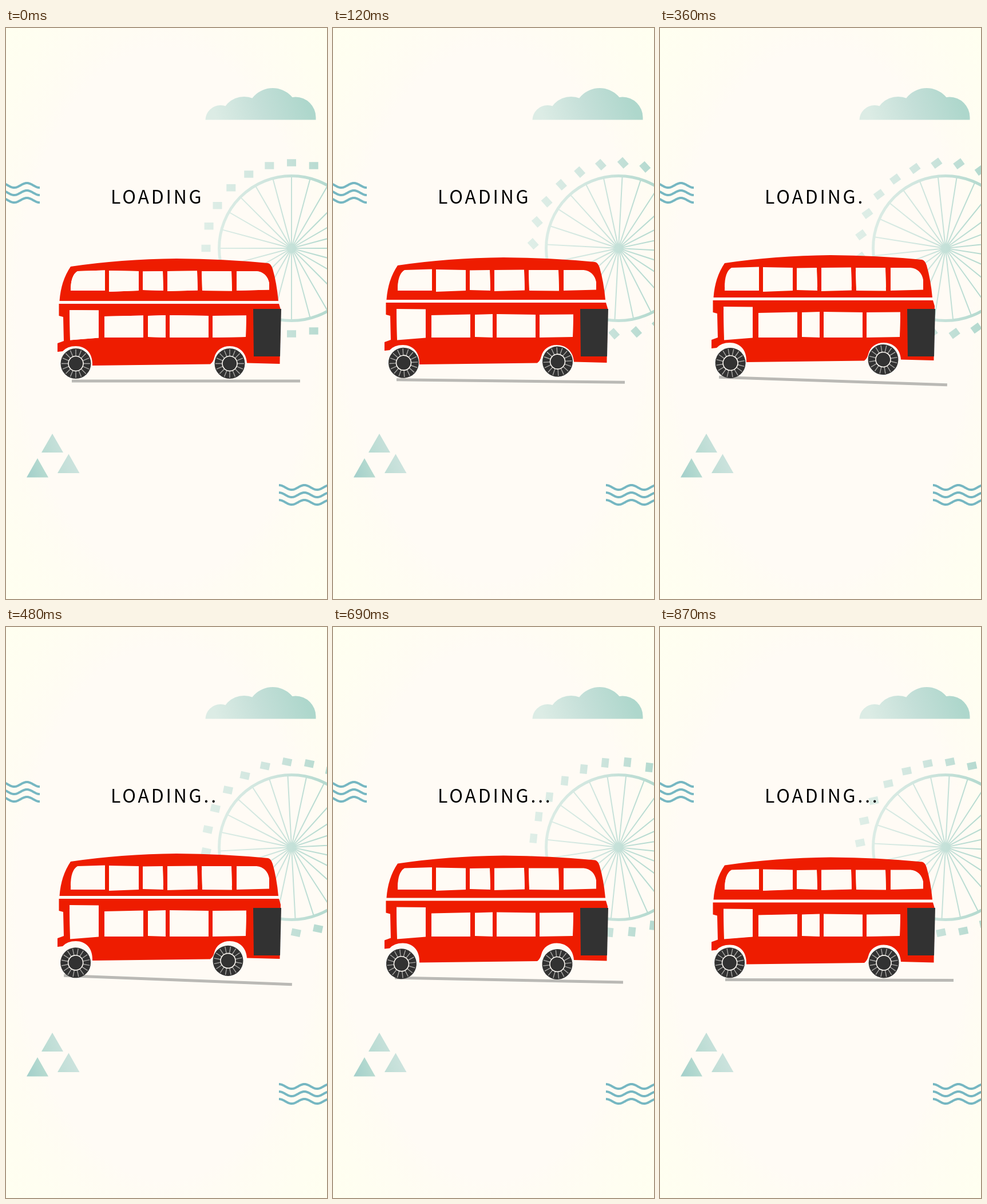
Recreate the animation shown at these times as an HTML page with a canvas. Size 561 by 998 pixels, loop 0.9 s.

```html
<!DOCTYPE html>
<html lang="en">
<head>
<meta charset="utf-8">
<title>Loading</title>
<style>
  html, body { margin: 0; width: 100%; height: 100%; overflow: hidden; background: #fffff0; }
  canvas, svg { position: absolute; left: 0; top: 0; width: 561px; height: 998px; }
  text { font: 400 32px "Noto Sans CJK SC", "Noto Sans CJK JP", "Noto Sans CJK", "Noto Sans", sans-serif; letter-spacing: 3.8px; }
</style>
</head>
<body>
<canvas id="stage"></canvas>
<svg viewBox="0 0 561 998"><text id="label" x="183" y="307">LOADING</text></svg>
<script>
const W = 561, H = 998, LOOP = 900, STEP = 30, TAU = Math.PI * 2;
const CREAM = '#fffbf5', RED = '#ee1c00', DARK = '#323232';
const canvas = document.getElementById('stage');
const label = document.getElementById('label');
const ctx = canvas.getContext('2d');
const dpr = window.devicePixelRatio || 1;
canvas.width = W * dpr;
canvas.height = H * dpr;

function linear(x0, y0, x1, y1, ...colors) {
  const g = ctx.createLinearGradient(x0, y0, x1, y1);
  colors.forEach((c, i) => g.addColorStop(i / (colors.length - 1), c));
  return g;
}
const eyeTint = linear(345, 0, 575, 0, '#dfeee7', '#cfe5de', '#b0d8cd');
const cloudTint = linear(370, 168, 520, 118, '#dcece5', '#c4dfd8', '#aed7cc');
const hillTint = linear(36, 785, 128, 755, '#a2cfca', '#b5dad0', '#c3dfd8', '#cfe4df');
const glow = ctx.createRadialGradient(0, 0, 0, 0, 0, 396);
[[0, CREAM], [0.66, CREAM], [0.72, '#fffcf3'], [0.88, '#fffef1'], [1, '#fffff0']]
  .forEach(([p, c]) => glow.addColorStop(p, c));

const body = new Path2D(
  'M113 417Q200 404 298 403Q380 403.5 458 411Q463 412 466 421Q473 445 476 477H93.5Q96 442 113 417Z' +
  'M92.5 482H477L480 492L478.5 587L421 585.5C420 567 407 556 391 556C378 556 367 563 364 576' +
  'Q362 584 357 587.5L151 590C152 568 139 556 122 556Q107 556 99 565L90 566V551L101 547L100 505L92.5 503Z');
const panes = new Path2D(
  'M113 459Q113 432 125 425L173 423.5V459Z' +
  'M180 424L232 425V459L180 461Z' +
  'M239 425.5L274 425L275 459L239 458Z' +
  'M282 425L334 424.5L335 458.5L282 460Z' +
  'M342 425H394L395 459.5L343 459Z' +
  'M403 425H438Q456 427 460 446V457.5L403 459Z' +
  'M111 493L162 493.5V541.5L112 545.5Z' +
  'M172 504L240 502.5V541H172Z' +
  'M248 503L279 502V541L248 540Z' +
  'M286 502L354 503V541H286Z' +
  'M361 503L420 502.5L419 540L361 541Z');
const door = new Path2D('M432 491H481L479 574H433Z');
const hills = new Path2D(
  'M81 709L100 742H62ZM55 752L74 785.5H36ZM109.5 744.5L128.5 778H90Z');

// Rows of [time, dx, dy]
const FRONT = [[0, 0, 0], [225, 2.7, -2.5], [450, 0, 0], [675, -2.7, 2.4], [900, 0, 0]];
const REAR = [[0, 0, 0], [225, 2.8, -6.4], [360, -1, -7], [450, -3.5, -4],
  [570, -1.5, -0.5], [682, 1, 3.1], [900, 0, 0]];

function at(keys, t) {
  const i = keys.findIndex(k => k[0] > t);
  const [t0, x0, y0] = keys[i - 1], [t1, x1, y1] = keys[i];
  const p = (t - t0) / (t1 - t0);
  return [x0 + (x1 - x0) * p, y0 + (y1 - y0) * p];
}

function local(x, y, angle, draw) {
  ctx.save();
  ctx.translate(x, y);
  ctx.rotate(angle);
  draw();
  ctx.restore();
}

function fill(path, color) {
  ctx.fillStyle = color;
  ctx.fill(path);
}

function disc(r, color) {
  ctx.beginPath();
  ctx.arc(0, 0, r, 0, TAU);
  ctx.fillStyle = color;
  ctx.fill();
}

function background() {
  ctx.save();
  ctx.translate(W / 2, H / 2);
  ctx.scale(1, H / W);
  ctx.fillStyle = glow;
  ctx.fillRect(-W, -W, 2 * W, 2 * W);
  ctx.restore();
}

function cloud() {
  ctx.save();
  ctx.beginPath();
  ctx.rect(340, 95, 210, 65.5);
  ctx.clip();
  ctx.beginPath();
  for (const [x, y, r] of [[375, 161.5, 26.5], [416, 160.5, 40.5], [466, 150, 45], [506, 156, 35.5]]) {
    ctx.moveTo(x + r, y);
    ctx.arc(x, y, r, 0, TAU);
  }
  ctx.rect(375, 145, 131, 16);
  ctx.rect(500, 156, 41.5, 5);
  ctx.fillStyle = cloudTint;
  ctx.fill();
  ctx.restore();
}

function waves(x0, x1, crest, mid) {
  ctx.strokeStyle = '#76b7c2';
  ctx.lineWidth = 4;
  for (let row = 0; row < 3; row++) {
    ctx.beginPath();
    for (let x = x0; x <= x1; x++) {
      ctx.lineTo(x, mid + row * 13 - 4 * Math.cos((x - crest) * TAU / 44.5));
    }
    ctx.stroke();
  }
}

// The tint stays fixed on the stage while the geometry turns.
function bigWheel(turn) {
  const cx = 499, cy = 385;
  ctx.strokeStyle = ctx.fillStyle = eyeTint;
  ctx.lineWidth = 5;
  ctx.beginPath();
  ctx.arc(cx, cy, 126.5, 0, TAU);
  ctx.stroke();
  const spokes = new Path2D(), cabins = new Path2D(), cabin = new Path2D();
  cabin.rect(-8, -6.25, 16, 12.5);
  for (let i = 0; i < 24; i++) {
    const a = i * TAU / 24 + turn, c = Math.cos(a), s = Math.sin(a);
    spokes.moveTo(cx, cy);
    spokes.lineTo(cx + 126 * c, cy + 126 * s);
    cabins.addPath(cabin, new DOMMatrix()
      .translate(cx + 149.5 * c, cy + 149.5 * s).rotate(turn * 360 / TAU));
  }
  ctx.lineWidth = 2;
  ctx.stroke(spokes);
  ctx.fill(cabins);
}

function tyre(x, y, [dx, dy], turn) {
  local(x + dx, y + dy, turn, () => {
    disc(26.5, DARK);
    ctx.strokeStyle = '#aaa9a6';
    ctx.lineWidth = 1.4;
    ctx.beginPath();
    for (let i = 0; i < 16; i++) {
      const a = i * TAU / 16, c = Math.cos(a), s = Math.sin(a);
      ctx.moveTo(13 * c, 13 * s);
      ctx.lineTo(25 * c, 25 * s);
    }
    ctx.stroke();
    disc(13.8, CREAM);
    disc(12.2, DARK);
  });
}

function draw(t) {
  const turn = t / LOOP * TAU;
  const sway = 1 - Math.abs(1 - t / (LOOP / 2));
  ctx.setTransform(dpr, 0, 0, dpr, 0, 0);
  background();
  cloud();
  waves(-2, 59, 36.5, 275);
  waves(477, 563, 477, 803);
  fill(hills, hillTint);
  bigWheel(turn);

  local(314.5 - 15 * sway, 617, 2.4 * sway * TAU / 360, () => {
    ctx.fillStyle = '#bab9b5';
    ctx.fillRect(-199.5, -2.5, 399, 5);
  });
  local(0, -7.5 * sway, 0, () => {
    ctx.fillStyle = CREAM;
    ctx.fillRect(93.5, 476, 383, 7);
    fill(body, RED);
    fill(panes, CREAM);
  });
  fill(panes, CREAM);
  fill(door, DARK);
  tyre(122, 586.5, at(FRONT, t), -turn);
  tyre(391, 586.5, at(REAR, t), -turn);

  label.textContent = 'LOADING' + '.'.repeat(Math.floor(t / 225));
}

const start = performance.now();
function tick(now) {
  const t = Math.max(0, now - start) % LOOP;
  draw(Math.floor(t / STEP) * STEP);
  requestAnimationFrame(tick);
}
draw(0);
requestAnimationFrame(tick);
</script>
</body>
</html>
```
